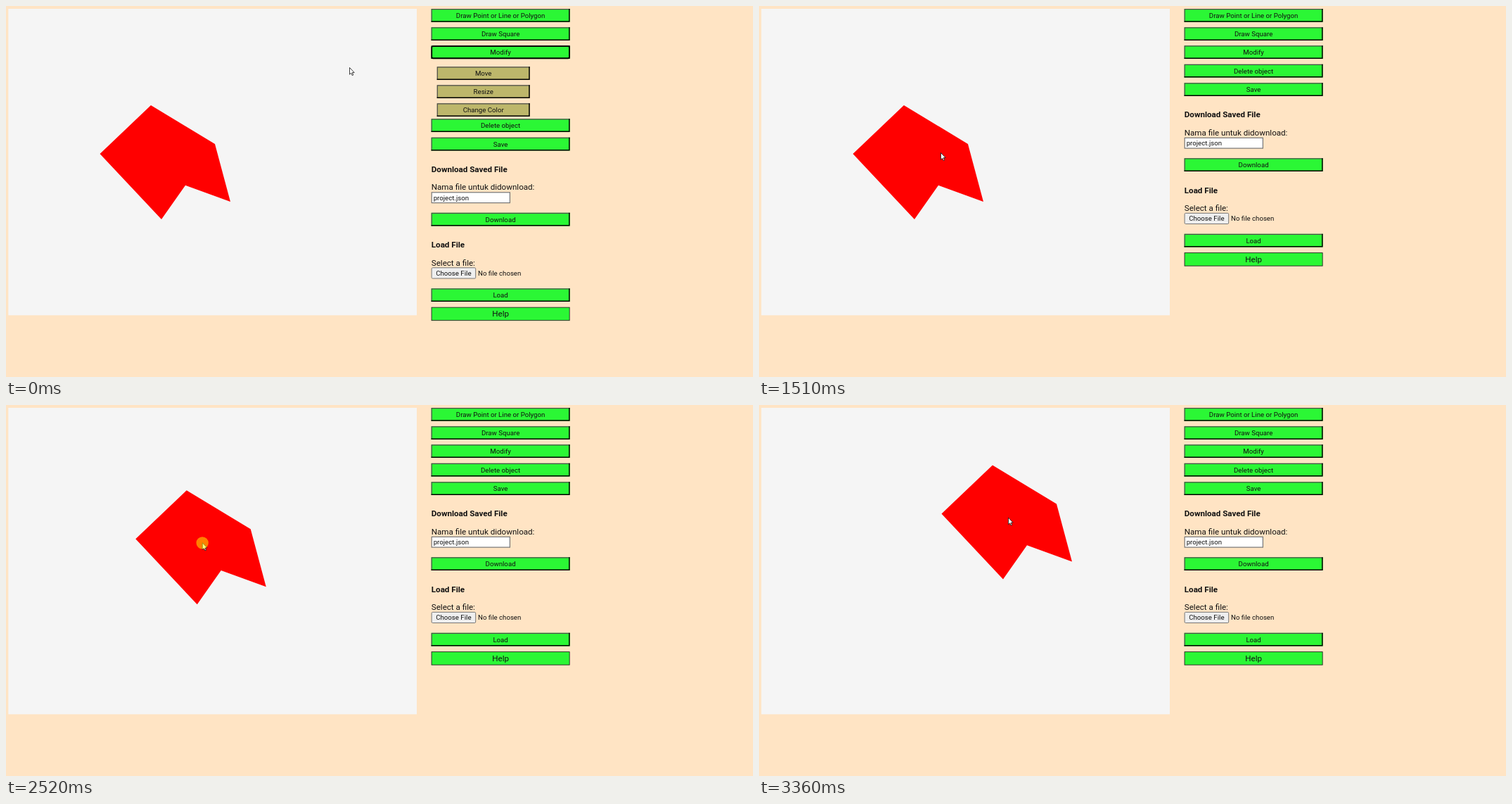
Write an HTML page that moves like this. It is 1062 by 527 pixels and loops after 3.76 s.

```html
<!DOCTYPE html>
<html lang="en">
<head>
<meta charset="utf-8">
<title>Polygon editor</title>
<style>
  html, body { margin: 0; height: 100%; overflow: hidden; background: #ffe4c4; }
  svg { display: block; font: 9.67px Roboto, sans-serif; }
  .big { font-size: 11.6px; }
  .bold { font-size: 11.6px; font-weight: bold; }
  .mid { text-anchor: middle; }
</style>
</head>
<body>
<svg id="stage" width="1062" height="527" viewBox="0 0 1062 527">
  <rect x="3.3" y="4" width="580.7" height="435.3" fill="#f5f5f5"/>
  <path id="shape" fill="red" d="M206 141 297 196 319 278 255 254.7 221 303 133.5 210Z"/>
  <g id="panel"></g>
  <g id="pointer">
    <path d="M.5 .5V10.2L2.7 8.2 4.2 11.6 5.7 11 4.3 7.6H7.2Z" fill="#fff" stroke="#111" stroke-width=".8"/>
    <circle id="click" cx=".4" cy=".6" r="8.7" fill="#ff0" fill-opacity=".5"/>
  </g>
</svg>
<script>
const LOOP = 3760, PRESS = 740, RELEASE = 890, GRAB = 1970, DRAG = 2120, DROP = 3360;
const GRIP = [228, 215], MENU_HEIGHT = 77.5;
const GREEN = '#2bf735', KHAKI = '#bdb76b';

// Pointer moves: first step, last step, number of steps, target x, y
const START = [488, 87];
const moves = [
  [140, 510, 6, 631, 87],
  [890, 1350, 7, 348, 178],
  [1430, 1510, 2, 258, 208],
  [1880, 1880, 1, 229, 214],
  [GRAB, GRAB, 1, ...GRIP],
  [DRAG, 2290, 3, 242, 211],
  [2370, 2590, 4, 291, 190],
  [2670, 2670, 1, 303, 184],
  [2750, 2980, 4, 339, 169.5],
  [3050, 3130, 2, 354, 161],
  [DROP, DROP, 1, 354, 159.5]
];

const byId = id => document.getElementById(id);
const text = (x, y, label, kind = '') =>
  `<text x="${x}" y="${y}" class="${kind}" fill="#111">${label}</text>`;
const box = (x, y, w, h, fill, stroke, line = 1, radius = 0) =>
  `<rect x="${x + line / 2}" y="${y + line / 2}" width="${w - line}" height="${h - line}"
    rx="${radius}" fill="${fill}" stroke="${stroke}" stroke-width="${line}"/>`;

function button(y, label, x = 604.6, w = 197, fill = GREEN) {
  const h = 18.8, right = x + w - .75, bottom = y + h - .75;
  return `<rect x="${x}" y="${y}" width="${w}" height="${h}" fill="${fill}"/>
    <path d="M${x + .6} ${y + h}V${y + .6}H${x + w}" fill="none" stroke="#4c4c4c" stroke-width="1.2"/>
    <path d="M${x} ${bottom}H${right}V${y}" fill="none" stroke="#000" stroke-width="1.5"/>
    ${text(x + w / 2, y + 12.8, label, 'mid')}`;
}
const menuButton = (y, label) => button(y, label, 612.7, 132, KHAKI);

byId('panel').innerHTML =
  button(4, 'Draw Point or Line or Polygon') +
  button(30.2, 'Draw Square') +
  button(56.3, 'Modify') +
  `<g id="modifyFocus">${box(604.4, 56.2, 197.4, 19, 'none', '#000', 1.7, 2)}</g>
  <g id="menu">
    <g id="move">${menuButton(86.3, 'Move')}
      <g id="moveFocus">${box(612.5, 86.2, 132.4, 19, 'none', '#000', 1.5, 2)}</g>
    </g>
    ${menuButton(112.3, 'Resize')}${menuButton(138.3, 'Change Color')}
  </g>
  <g id="rest">` +
  button(160.3, 'Delete object') +
  button(186.7, 'Save') +
  text(604.8, 235.7, 'Download Saved File', 'bold') +
  text(604.8, 261.3, 'Nama file untuk didownload:', 'big') +
  box(604.6, 264.2, 112.4, 16, '#fff', '#767676', 1.2) +
  text(607.7, 275.7, 'project.json') +
  button(293.7, 'Download') +
  text(604.8, 343, 'Load File', 'bold') +
  text(604.8, 368.6, 'Select a file:', 'big') +
  box(604.6, 371.3, 63.6, 16.2, '#efefef', '#767676', 1, 1.5) +
  text(636.4, 382.6, 'Choose File', 'mid') +
  text(671, 382.6, 'No file chosen') +
  button(401.2, 'Load') +
  box(604.6, 427.7, 197, 19.4, GREEN, '#222', .9) +
  text(703.1, 441.2, 'Help', 'big mid') + '</g>';

function pointerAt(t) {
  let [x, y] = START;
  for (const [first, last, steps, toX, toY] of moves) {
    if (t < first) break;
    const gap = (last - first) / (steps - 1) || 1;
    const part = Math.min(steps, Math.floor((t - first) / gap + 1e-6) + 1) / steps;
    x += (toX - x) * part;
    y += (toY - y) * part;
  }
  return [x, y];
}

const show = (id, on) => byId(id).setAttribute('visibility', on ? 'inherit' : 'hidden');
const shift = (id, x, y) => byId(id).setAttribute('transform', `translate(${x} ${y})`);

function draw() {
  const t = performance.now() % LOOP;
  const [x, y] = pointerAt(t);
  const open = t < RELEASE, pressed = t >= PRESS && open;
  shift('pointer', x, y);
  show('click', pressed || (t >= GRAB && t < DROP));
  show('menu', open);
  show('modifyFocus', t < PRESS);
  show('moveFocus', pressed);
  byId('move').setAttribute('opacity', x > 613 ? .6 : 1);
  shift('rest', 0, open ? 0 : -MENU_HEIGHT);
  if (t < DRAG) shift('shape', 0, 0);
  else shift('shape', x - GRIP[0], y - GRIP[1]);
  requestAnimationFrame(draw);
}
draw();
</script>
</body>
</html>
```
